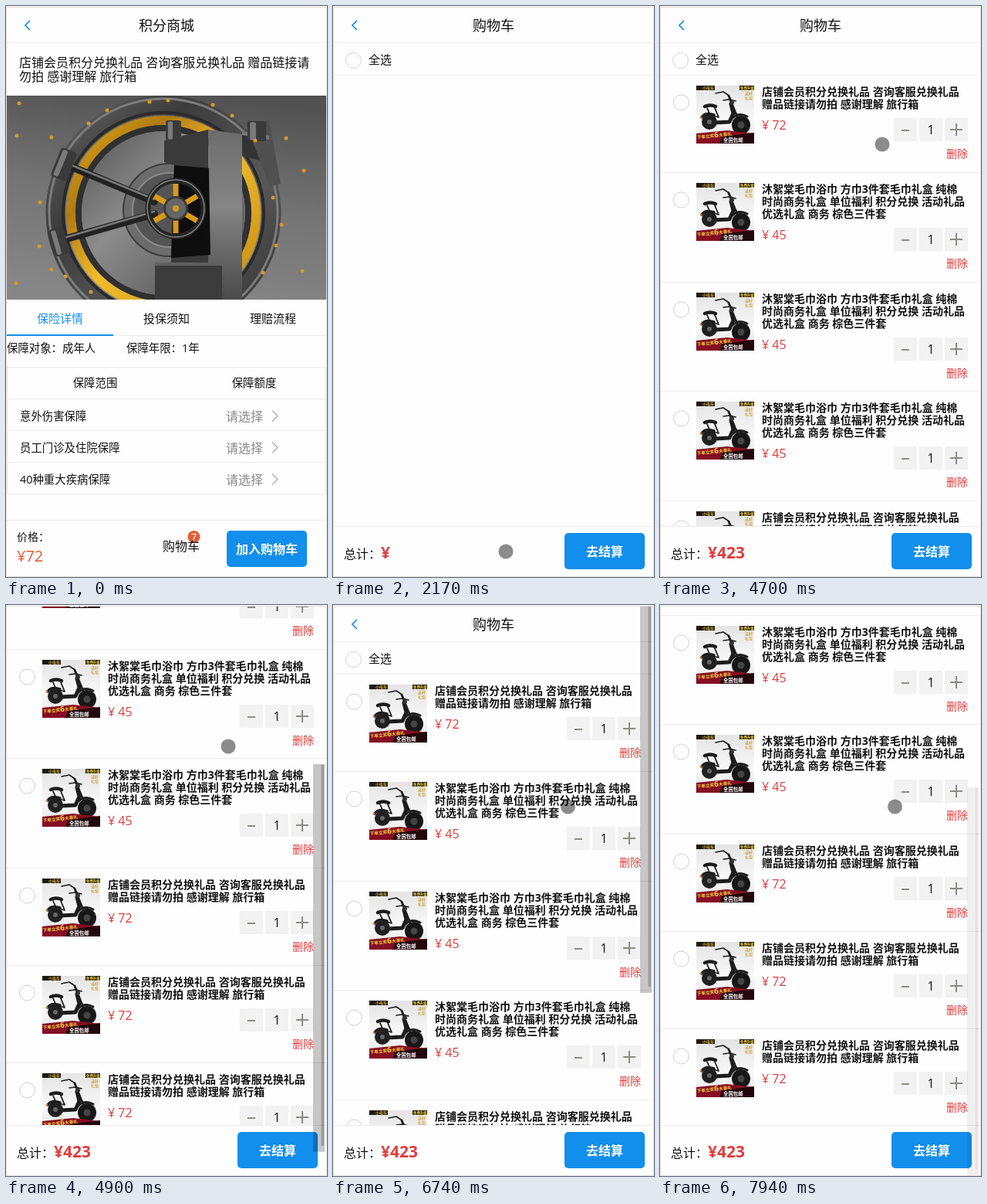
Write an HTML page that moves like this. It is 416 px wide and 739 px high and loops after 7990 ms.

```html
<!DOCTYPE html>
<html lang="zh-CN">
<head>
<meta charset="utf-8">
<title>积分商城</title>
<style>
@property --scroll { syntax: "<number>"; inherits: true; initial-value: 0; }
html, body { margin: 0; width: 100%; height: 100%; overflow: hidden; background: #fefefe; }
svg { display: block; width: 100vw; height: 100vh; animation: scroll 7990ms step-end infinite; }
text { font: 16px "Open Sans", "Noto Sans CJK SC", "Noto Sans CJK", sans-serif; fill: #111; white-space: pre; }
.colon { font-family: "Noto Sans CJK TC", "Noto Sans CJK JP", sans-serif; }
.s14 { font-size: 14px; }
.s144 { font-size: 14.4px; }
.s15 { font-size: 15px; }
.s18 { font-size: 18px; }
.s21 { font-size: 21px; }
.b { font-weight: 700; }
.mid { text-anchor: middle; }
.red { fill: #e03c3c; }
.white { fill: #fff; }
.blue { fill: #128eec; }
.gray { fill: #8a8a8a; }
.line { fill: #ececec; shape-rendering: crispEdges; }
.ring { fill: #fefefe; stroke: #cfcfcf; }
.tiny { font-size: 5px; font-weight: 700; fill: #f8d838; }
.tan { fill: #c9a53a; }

#shop { animation: leave 7990ms step-end infinite; }
#cart { animation: enter 7990ms step-end infinite; }
.late { animation: load 7990ms step-end infinite; }
#page { transform: translateY(calc(var(--scroll) * -1px)); }
#thumb { transform: translateY(calc(var(--scroll) * .686px)); animation: fade 7990ms linear infinite; }
#cursor { animation: point 7990ms step-end infinite; }

@keyframes leave { 0% { visibility: visible } 27.15%, 100% { visibility: hidden } }
@keyframes enter { 0% { visibility: hidden } 27.15%, 100% { visibility: visible } }
@keyframes load { 0% { opacity: 0 } 31.03%, 100% { opacity: 1 } }
/* each wheel notch jumps 100px, up to the end of the page */
@keyframes scroll {
  0% { --scroll: 0 }
  60.07% { --scroll: 100 }
  60.7% { --scroll: 200 }
  61.32% { --scroll: 300 }
  62.32% { --scroll: 344 }
  77.34% { --scroll: 144 }
  77.97% { --scroll: 44 }
  78.59% { --scroll: 0 }
  87.48% { --scroll: 100 }
  88.48% { --scroll: 200 }
  89.48% { --scroll: 300 }
  90.73%, 100% { --scroll: 344 }
}
@keyframes fade {
  0%, 31.02% { opacity: 0 }
  31.03%, 37.42% { opacity: 1 }
  40.55%, 60.06% { opacity: 0 }
  60.07%, 68.71% { opacity: 1 }
  71.84%, 77.33% { opacity: 0 }
  77.34%, 84.35% { opacity: 1 }
  87.47% { opacity: 0 }
  87.48%, 97.12% { opacity: 1 }
  99.37%, 100% { opacity: .28 }
}
@keyframes point {
  0% { transform: translate(307px, 760px) }
  5.63% { transform: translate(307px, 740px); animation-timing-function: steps(9, start) }
  11.38% { transform: translate(224px, 706px) }
  31.03% { transform: translate(224px, 706px); animation-timing-function: steps(7, start) }
  35.79% { transform: translate(334px, 497px) }
  37.42% { transform: translate(334px, 497px); animation-timing-function: steps(11, start) }
  45.05% { transform: translate(323px, 156px) }
  47.93% { transform: translate(323px, 156px); animation-timing-function: steps(11, start) }
  54.31% { transform: translate(401px, 132px) }
  55.94% { transform: translate(401px, 132px); animation-timing-function: steps(5, start) }
  59.44% { transform: translate(288px, 179px) }
  60.07% { transform: translate(288px, 183px) }
  68.71% { transform: translate(288px, 183px); animation-timing-function: steps(8, start) }
  74.09%, 100% { transform: translate(304.5px, 261px) }
}
</style>
</head>
<body>
<svg viewBox="0 0 416 739" preserveAspectRatio="none">
  <defs>
    <linearGradient id="wall" x1=".6" y1="0" x2=".4" y2="1">
      <stop offset="0" stop-color="#525252"/><stop offset=".5" stop-color="#747474"/>
      <stop offset="1" stop-color="#868686"/>
    </linearGradient>
    <linearGradient id="rim" x1="0" y1="0" x2="1" y2="1">
      <stop offset="0" stop-color="#626262"/><stop offset=".3" stop-color="#3c3c3c"/>
      <stop offset=".65" stop-color="#585858"/><stop offset="1" stop-color="#333"/>
    </linearGradient>
    <linearGradient id="door" x1="0" y1="0" x2="1" y2="1">
      <stop offset="0" stop-color="#555"/><stop offset=".4" stop-color="#8c8c8c"/>
      <stop offset="1" stop-color="#4a4a4a"/>
    </linearGradient>
    <linearGradient id="gold" x1="0" y1="0" x2="1" y2="1">
      <stop offset="0" stop-color="#e0aa20"/><stop offset=".25" stop-color="#b07a10"/>
      <stop offset=".5" stop-color="#f0bd2c"/><stop offset="1" stop-color="#c68a10"/>
    </linearGradient>
    <linearGradient id="plate" x1="0" y1="0" x2="0" y2="1">
      <stop offset="0" stop-color="#6c6c6c"/><stop offset=".45" stop-color="#858585"/>
      <stop offset="1" stop-color="#4a4a4a"/>
    </linearGradient>
    <linearGradient id="studio" x1="0" y1="0" x2="0" y2="1">
      <stop offset="0" stop-color="#e4e4e4"/><stop offset=".6" stop-color="#f8f8f8"/>
      <stop offset="1" stop-color="#e2e2e2"/>
    </linearGradient>
    <clipPath id="photo"><rect x="1" y="116" width="414" height="264"/></clipPath>
    <clipPath id="tile"><rect width="75" height="75"/></clipPath>

    <g id="head">
      <path d="M31 19 25 25 31 31" fill="none" stroke="#128eec" stroke-width="1.7"/>
      <rect class="line" x="1" y="47" width="414" height="1"/>
    </g>

    <g id="bike" clip-path="url(#tile)">
      <rect width="75" height="75" fill="url(#studio)"/>
      <rect width="24" height="6" fill="#1d1a14"/>
      <text class="tiny tan" x="8" y="5">小电车</text>
      <rect x="56" width="19" height="6" fill="#1d1a14"/>
      <text class="tiny" x="57" y="5" style="font-size:4.4px">免费升级</text>
      <text class="tiny tan" x="63" y="12">送好</text>
      <text class="tiny tan" x="63" y="18">礼包</text>
      <g fill="none" stroke="#1c1c1c" stroke-linecap="round" stroke-linejoin="round">
        <path d="M25 10 35 8 41 12 46 20M35 19 43 18 51 20" stroke-width="1.6"/>
        <path d="M42 13 50 33 58 51" stroke-width="2.8"/>
        <path d="M45 24 48 36 43 47 24 48 18 42" stroke-width="5"/>
        <path d="M11 27Q18 24 25 27" stroke-width="4.5"/>
        <path d="M14 29 18 38 29 41 24 29" stroke-width="1.8"/>
        <path d="M7 41Q12 34 23 38" stroke-width="3.5"/>
        <path d="M47 42Q55 34 66 40" stroke-width="3"/>
      </g>
      <circle cx="17" cy="47" r="10" fill="#202020"/><circle cx="17" cy="47" r="3" fill="#666"/>
      <circle cx="58" cy="51" r="12" fill="#171717"/><circle cx="58" cy="51" r="4.5" fill="#454545"/>
      <circle cx="46" cy="22" r="3" fill="#333"/><circle cx="6" cy="41" r="1.4" fill="#d9722a"/>
      <path d="M0 62 40 58 75 62V75H0Z" fill="#860d24"/>
      <path d="M30 75 34 66 75 61V75Z" fill="#22070c"/>
      <g transform="rotate(-6 2 69)">
        <text class="tiny" x="1" y="69" style="font-size:5.6px">下单立奖</text>
        <text class="tiny" x="23.5" y="69.5" style="font-size:10px">6</text>
        <text class="tiny" x="29.5" y="69" style="font-size:5.6px">大豪礼</text>
      </g>
      <text class="tiny white" x="35" y="73" style="font-size:6.4px;fill:#fff">全国包邮</text>
    </g>

    <g id="base">
      <rect class="line" x="1" y="-1" width="414" height="1"/>
      <circle class="ring" cx="27.5" cy="35" r="10"/>
      <use href="#bike" x="47" y="13"/>
    </g>
    <g id="qty">
      <path d="M303 55h30v30h-30ZM336 55h30v30h-30ZM369 55h30v30h-30Z" fill="#f2f2f2"/>
      <path d="M313 71h10M376 70h16M384 62v16" stroke="#8c8c86" stroke-width="2"/>
      <text class="mid" x="351" y="76">1</text>
      <text class="s14 red" x="371" y="106">删除</text>
    </g>
    <g id="case">
      <use href="#base"/>
      <text class="s14 b" x="132" y="26">店铺会员积分兑换礼品 咨询客服兑换礼品</text>
      <text class="s14 b" x="132" y="42">赠品链接请勿拍 感谢理解 旅行箱</text>
      <text class="red" x="132" y="70">¥ 72</text>
      <use href="#qty"/>
    </g>
    <g id="towel">
      <use href="#base"/>
      <text class="s14 b" x="132" y="26">沐絮棠毛巾浴巾 方巾3件套毛巾礼盒 纯棉</text>
      <text class="s14 b" x="132" y="42">时尚商务礼盒 单位福利 积分兑换 活动礼品</text>
      <text class="s14 b" x="132" y="58">优选礼盒 商务 棕色三件套</text>
      <text class="red" x="132" y="86">¥ 45</text>
      <use href="#qty" y="16"/>
    </g>

    <g id="choice">
      <rect class="line" x="1" y="508" width="414" height="1"/>
      <text class="gray" x="285" y="537">请选择</text>
      <path d="M345 523.5 352 530.5 345 537.5" fill="none" stroke="#b4b4b4" stroke-width="1.5"/>
    </g>
    <g id="clamp">
      <rect x="-11" y="-20" width="22" height="40" rx="4" fill="#3a3a3a"/>
      <rect x="-8" y="-18" width="7" height="36" rx="3" fill="#7a7a7a"/>
    </g>
    <g id="spoke"><rect x="-3.5" y="-32" width="7" height="21" fill="#d99a18"/></g>
  </defs>

  <rect width="416" height="739" fill="#fefefe"/>

  <g id="shop">
    <use href="#head"/>
    <text class="s18 mid" x="208" y="32">积分商城</text>
    <text x="17" y="79">店铺会员积分兑换礼品 咨询客服兑换礼品 赠品链接请</text>
    <text x="17" y="97">勿拍 感谢理解 旅行箱</text>

    <g clip-path="url(#photo)">
      <rect x="1" y="116" width="414" height="264" fill="url(#wall)"/>
      <g fill="none">
        <circle cx="204" cy="268" r="140" stroke="url(#rim)" stroke-width="25"/>
        <circle cx="204" cy="268" r="148" stroke="#7c7c7c" stroke-width="3"/>
        <circle cx="204" cy="268" r="130" stroke="#2a2a2a" stroke-width="4"/>
        <circle cx="204" cy="268" r="120" stroke="url(#gold)" stroke-width="12"/>
        <circle cx="204" cy="268" r="110" stroke="#303030" stroke-width="8"/>
      </g>
      <circle cx="204" cy="268" r="106" fill="url(#door)"/>
      <circle cx="212" cy="264" r="60" fill="#6c6c6c" stroke="#3c3c3c" stroke-width="2"/>
      <circle cx="212" cy="264" r="48" fill="#545454" stroke="#8a8a8a" stroke-width="2"/>
      <path d="M205 174 262 160V380H214V322L218 206 205 202Z" fill="#3a3a3a"/>
      <path d="M218 206 266 210V322L214 326Z" fill="#0e0e0e"/>
      <path d="M262 160 306 166V380H266Z" fill="url(#plate)"/>
      <path d="M306 162 341 168V203L306 194Z" fill="#333"/>
      <path d="M310 150 341 148 356 230 342 234Z" fill="#505050"/>
      <path d="M306 162 341 168V173L306 167Z" fill="#777"/>
      <path d="M193 332H280V380H193Z" fill="#3c3c3c"/>
      <path d="M193 332H280V336H193Z" fill="#606060"/>
      <g stroke-linecap="round">
        <path d="M80 206 192 253M72 303 192 269" stroke="#222" stroke-width="10"/>
        <path d="M80 204 192 250M72 301 192 266" stroke="#777" stroke-width="2.5"/>
      </g>
      <use href="#clamp" transform="translate(75 205) rotate(22)"/>
      <use href="#clamp" transform="translate(69 305) rotate(-16) scale(.9)"/>
      <use href="#clamp" transform="translate(217 161) scale(.9 .65)"/>
      <use href="#clamp" transform="translate(325 162) scale(1.1 .65)"/>
      <g transform="translate(220 262)">
        <use href="#spoke"/><use href="#spoke" transform="rotate(60)"/><use href="#spoke" transform="rotate(120)"/>
        <use href="#spoke" transform="rotate(180)"/><use href="#spoke" transform="rotate(240)"/><use href="#spoke" transform="rotate(300)"/>
        <circle r="36" fill="none" stroke="#252525" stroke-width="7"/>
        <circle r="37" fill="none" stroke="#808080" stroke-width="1.5"/>
        <circle r="16" fill="#3a3a3a"/><circle r="13" fill="#666"/><circle r="4" fill="#d39a22"/>
      </g>
      <path d="M17 126h0M43 311h0M59 170h0M44 254h0M59 341h0M77 350h0M107 152h0M131 135h0M186 124h0M210 122h0M268 128h0M293 142h0M323 174h0M363 171h0M386 213h0M346 248h0M357 283h0M350 310h0M333 345h0M384 343h0M14 168h0M13 359h0M110 370h0"
        stroke="#d29a2c" stroke-width="5" stroke-linecap="round"/>
    </g>

    <rect class="line" x="1" y="426" width="414" height="1"/>
    <rect class="blue" x="1" y="425" width="138" height="2"/>
    <text class="s15 mid blue" x="70" y="410">保险详情</text>
    <text class="s15 mid" x="208" y="410">投保须知</text>
    <text class="s15 mid" x="346" y="410">理赔流程</text>
    <text class="s144" x="1" y="448">保障对象<tspan class="colon">：</tspan>成年人</text>
    <text class="s144" x="156" y="448">保障年限<tspan class="colon">：</tspan>1年</text>

    <path class="line" d="M1 467H415V468H1ZM1 467H2V632H1ZM414 467H415V632H414ZM1 631H415V632H1Z"/>
    <text class="s144 mid" x="115.5" y="493">保障范围</text>
    <text class="s144 mid" x="321.5" y="493">保障额度</text>
    <use href="#choice"/><use href="#choice" y="41"/><use href="#choice" y="82"/>
    <text class="s144" x="18" y="536">意外伤害保障</text>
    <text class="s144" x="18" y="577">员工门诊及住院保障</text>
    <text class="s144" x="18" y="618">40种重大疾病保障</text>

    <rect class="line" x="1" y="665" width="414" height="1"/>
    <text class="s14" x="14" y="692">价格<tspan class="colon">：</tspan></text>
    <text x="14" y="719" style="font-size:20px;fill:#e2582c">¥72</text>
    <circle cx="243.5" cy="687" r="8" fill="#e2603c"/>
    <text class="mid white" x="243.5" y="692" style="font-size:13px">7</text>
    <text x="203" y="705">购物车</text>
    <rect class="blue" x="286" y="679" width="104" height="47" rx="5"/>
    <text class="b mid white" x="338" y="709">加入购物车</text>
  </g>

  <g id="cart">
    <g id="page">
      <use href="#head"/>
      <text class="s18 mid" x="208" y="32">购物车</text>
      <circle class="ring" cx="26.5" cy="70.5" r="10" style="stroke:#dccfcf"/>
      <text class="s15" x="46" y="75">全选</text>
      <rect class="line" x="1" y="89" width="414" height="1"/>
      <g class="late">
        <use href="#case" y="90"/>
        <use href="#towel" y="216"/>
        <use href="#towel" y="358"/>
        <use href="#towel" y="499"/>
        <use href="#case" y="641"/>
        <use href="#case" y="767"/>
        <use href="#case" y="893"/>
      </g>
    </g>
    <rect y="673" width="416" height="66" fill="#fefefe"/>
    <rect class="line" x="1" y="673" width="414" height="1"/>
    <text x="14" y="715">总计<tspan class="colon">：</tspan></text>
    <text class="b red s21" x="62" y="715">¥</text>
    <text class="b red s21 late" x="74" y="715">423</text>
    <rect class="blue" x="300" y="682" width="104" height="47" rx="5"/>
    <text class="b mid white" x="352" y="712">去结算</text>
    <g id="thumb">
      <rect x="398" width="15" height="502" fill="#000" fill-opacity=".22"/>
      <rect x="408.5" y="1" width="3.5" height="493" fill="#000" fill-opacity=".22"/>
    </g>
  </g>

  <rect width="416" height="1" fill="#fefefe"/>
  <rect x=".5" y="1.5" width="415" height="737" fill="none" stroke="#dedede"/>
  <circle id="cursor" r="9.5" fill="#000" fill-opacity=".45"/>
</svg>
</body>
</html>
```
